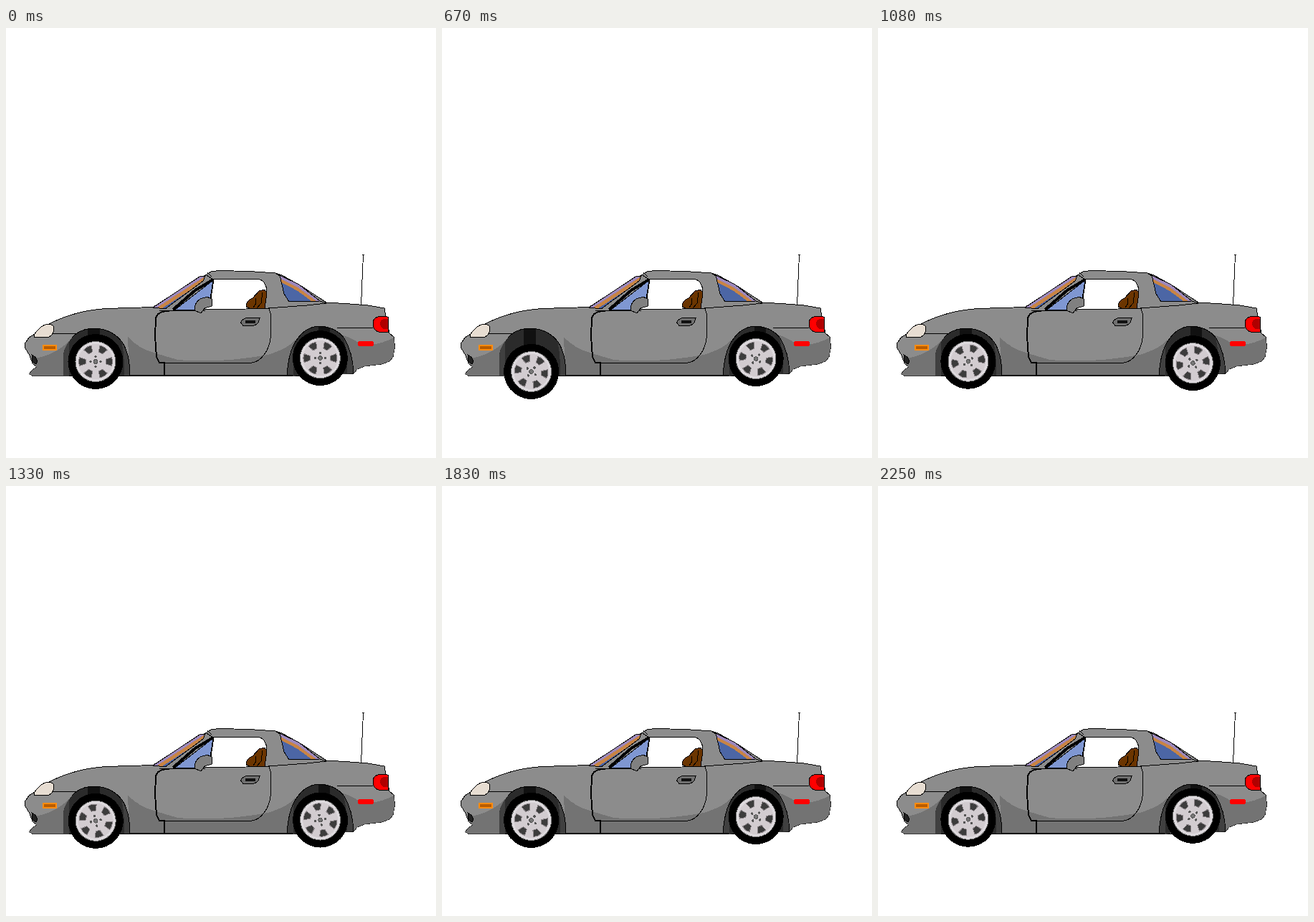
These frames come from a looping animation (600 by 600 pixels, 2.33 s). An HTML page:

```html
<!DOCTYPE html>
<html>
<head>
<meta charset="utf-8">
<style>
html, body { margin: 0; width: 100%; height: 100%; overflow: hidden; background: #fff; }
svg { display: block; width: 100vw; height: 100vh; }
.line { fill: none; stroke: #000; }
.edge { stroke: #000; }
</style>
</head>
<body>
<svg viewBox="0 0 600 600" shape-rendering="crispEdges">
  <defs>
    <clipPath id="bodyClip"><use href="#body"/></clipPath>
    <clipPath id="frontClip"><use href="#frontArch"/></clipPath>
    <clipPath id="rearClip"><use href="#rearArch"/></clipPath>
    <clipPath id="screenClip"><use href="#screen"/></clipPath>
    <clipPath id="rearGlassClip"><use href="#rearGlass"/></clipPath>
  </defs>

  <path class="line" stroke="#403048" d="M498.5 316L495.5 387M497 316.500h3"/>

  <!-- body and lower shading -->
  <path id="body" class="edge" fill="#8c8c8c" d="M32.500 482.500L37 477 43 473 37 468 33 457 27 447 26.500 440 32 432 40 427 49 418 62 412Q98 394 140 391.500L205 389.500 275 347 286 340 296 338.500 340 339.500 376 342 385 345 412 360 447 383 480 385 505 387 528 391 530 402 535 426 541 431 542.500 445 540 459 535 465 524 469 500 472 490 476 485 482 400 485.500H37Z"/>
  <g clip-path="url(#bodyClip)" fill="#737373">
    <path d="M170 431Q184 447 209 454L240 463Q300 468 365 456 395 447 404 434V486H172Z"/>
    <path d="M468 428Q485 433 494 441 515 446 543 431V486H468Z"/>
    <path d="M34 461Q64 460 88 437V486H28Z"/>
  </g>
  <path class="line" d="M66 426.500H98M462 418.500H512"/>

  <!-- wheel arches -->
  <path id="frontArch" fill="#2b2b2b" d="M80 485V455Q82 444 92 432 104 419 124 419 148 420 162 438 173 455 173 485Z"/>
  <g clip-path="url(#frontClip)">
    <path fill="#404040" d="M79 485V430H88V485ZM158 425Q166 450 165 486H176V425Z"/>
    <path fill="#111" d="M114 418h17v26h-17z"/>
  </g>
  <path id="rearArch" fill="#2b2b2b" d="M392 485Q394 452 405 436 417 417 437 416 460 417 472 433 484 453 485 482Z"/>
  <g clip-path="url(#rearClip)">
    <path fill="#404040" d="M391 486V440H401V486ZM468 420Q477 450 476 486H490V420Z"/>
    <path fill="#111" d="M436 415h16v24h-16z"/>
  </g>
  <path class="line" d="M92 432Q104 419 124 419 148 420 162 438 173 455 173 485M392 485Q394 452 405 436 417 417 437 416 460 417 472 433 484 453 485 482"/>

  <!-- glass -->
  <path id="screen" fill="#4a63a4" d="M205 390L270 347 278 346 275 353 222 392Z"/>
  <g clip-path="url(#screenClip)" fill="none">
    <path stroke="#c88444" stroke-width="5" d="M212 392L278 349"/>
    <path stroke="#9d88bb" stroke-width="5" d="M205 391L274 346"/>
  </g>
  <path class="line" d="M205 390L270 347 278 346 275 353 222 392Z"/>
  <path class="edge" fill="#7f97d2" d="M236 393L289 352 285 378 276 393Z"/>
  <path class="edge" fill="#fff" d="M290 350.500H352Q362 352 364 366L361 391 335 392 277 393 286 377Z"/>
  <path class="line" stroke-width="4" d="M233 393L264 366 289 351"/>
  <path class="line" d="M280 345L289 351M281 341L287 347"/>
  <path id="rearGlass" fill="#4c66a5" d="M382 345L409 358 438 381 395 382 388 371Z"/>
  <g clip-path="url(#rearGlassClip)" fill="none">
    <path stroke="#c88444" stroke-width="6" d="M383 351L408 364 434 383"/>
    <path stroke="#9d88bb" stroke-width="5" d="M381 346L409 360 438 382"/>
  </g>
  <path class="line" d="M382 345L409 358 438 381 395 382 388 371ZM376 342L382 346M438 381L447 384 420 387 366 391"/>

  <path class="edge" fill="#6b3500" d="M335 389Q335 380 344 377L353 367 361 365 364 370 361 391H340Z"/>
  <path class="line" stroke="#3a1c00" d="M345 390L349 384 348 377M358 369L356 384 350 391"/>

  <!-- door -->
  <path class="line" d="M361 391H367L369.500 400V430Q368 446 360 456 352 467.500 338 467.500H214M214 394.500H228L280 394"/>
  <path class="line" stroke-width="2" d="M228 395Q210 395 209 406L208 430 210 459 214 467H222M221 468V485M172 485H400"/>
  <path class="edge" fill="#808080" d="M263 394Q263 383 271 378 282 373 288 379L287 388 277 391 272 398Z"/>
  <path class="edge" fill="#707070" d="M327.500 411Q330 404.500 338 404.500H354L352 411Q349 415.500 342 415.500H331Z"/>
  <path fill="#111" d="M334 408H348V412H334Z"/>

  <!-- lamps -->
  <path class="edge" fill="#e7ddd2" d="M39.500 432L40 427Q48 415 57 413.500 66 413 67 418 67 428 60 431Z"/>
  <path fill="#b85c00" stroke="#ff8c10" stroke-width="2" d="M52 443H70V449H52Z"/>
  <path class="edge" fill="#222" d="M36 456L41 459 44 465 42 469 37 466Z"/>
  <path class="edge" fill="#f00" d="M533.500 403.500L530 402.500H521Q512 404 512 412 512 423 522 424.500H533.500Z"/>
  <path fill="#b00000" d="M533 406H528Q522 407 522 413 523 420 529 420H533Z"/>
  <rect x="491" y="437" width="22" height="7" rx="3" fill="#f00"/>

  <g id="wheels"></g>
</svg>
<script>
const around = (count, shape) =>
  Array.from({ length: count }, (_, i) => `<g transform="rotate(${i * 360 / count})">${shape}</g>`).join("");

const wheelArt = `
  <circle r="38.500"/>
  <circle r="28.500" fill="#777"/>
  <circle r="27.500" fill="#dedade"/>
  <circle r="24.500" fill="#d2ccd0"/>
  <g transform="rotate(30)">${around(6,
    '<path fill="#3c3c3c" stroke="#8a8488" d="M-6-22Q0-25 6-22L3-14H-3Z"/>')}</g>
  ${around(4, '<circle cy="-7" r="1.700" fill="#555"/>')}
  <circle r="2.800" fill="#777" stroke="#555"/>`;

// Each wheel turns about a point slightly off its centre and drops at the same dip.
const stepAngle = 360 / 7;
const wheels = [
  { x: 125.8, y: 466.3, dipAt: 8, depth: 13 },
  { x: 439.2, y: 461.4, dipAt: 14, depth: 11 },
];
const holder = document.getElementById("wheels");
holder.innerHTML = wheels.map(() => `<g><g transform="translate(-.8 -.8)">${wheelArt}</g></g>`).join("");

function draw(now) {
  const step = Math.floor((Math.floor(now % 2330 / 10) + 0.4) / (25 / 3));
  wheels.forEach((w, i) => {
    const drop = w.depth * Math.max(0, 1 - Math.abs(step - w.dipAt) / 3);
    holder.children[i].setAttribute("transform",
      `translate(${w.x} ${w.y + drop}) rotate(${-step * stepAngle})`);
  });
}

const start = performance.now();
function tick() {
  draw(performance.now() - start);
  requestAnimationFrame(tick);
}
tick();
</script>
</body>
</html>
```
